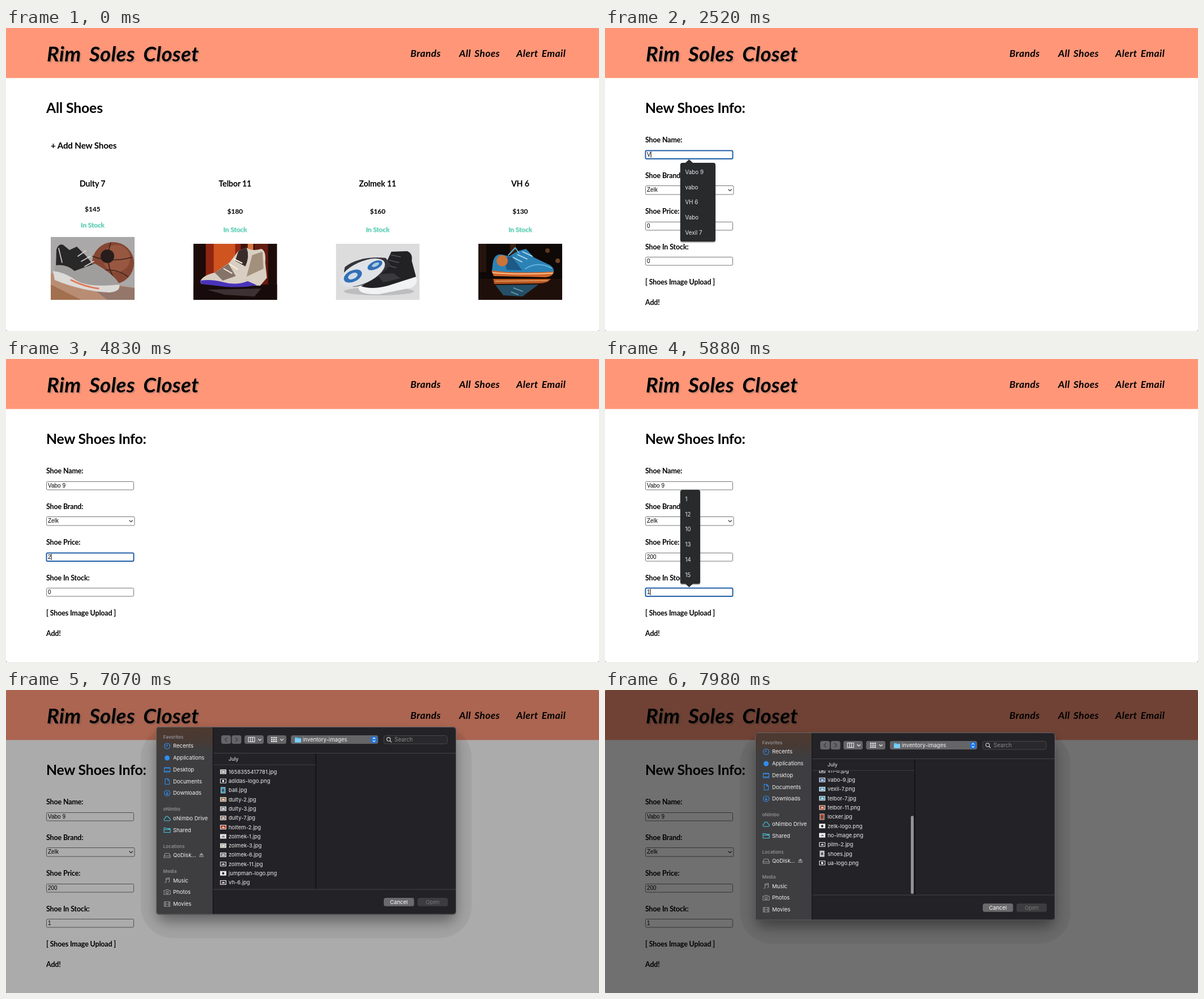
Animation, 1047 px wide and 535 px high, one loop 8000 ms. Source, as an HTML page:

```html
<!DOCTYPE html>
<html lang="en">
<head>
<meta charset="utf-8">
<title>Shoe inventory</title>
<style>
html, body { margin: 0; width: 100%; height: 100%; overflow: hidden; background: #777; }
svg { display: block; width: 100%; height: 100%; }
text { white-space: pre; }
.page { font-family: Lato, "Open Sans", sans-serif; font-weight: 700; letter-spacing: -.01em; }
.brand { font-family: Lato, sans-serif; font-weight: 700; font-style: italic; letter-spacing: .023em; }
.title { text-shadow: 2px 2px 2px rgba(120, 110, 105, .45); }
.stock { text-shadow: 1px 1px 1px rgba(95, 207, 181, .5); }
.field { font: 10px "Liberation Sans", Arial, sans-serif; letter-spacing: 0; }
.ui { font-family: Inter, Roboto, sans-serif; font-weight: 400; letter-spacing: 0; }
.mid { text-anchor: middle; }
.line { fill: none; stroke-linecap: round; stroke-linejoin: round; }
</style>
</head>
<body>
<svg id="stage" viewBox="0 0 1047 535" preserveAspectRatio="none"></svg>
<script>
const LOOP = 8000, STEP = 70;
const text = (x, y, size, str, fill = '#000', attrs = '') =>
  `<text x="${x}" y="${y}" font-size="${size}" fill="${fill}" ${attrs}>${str}</text>`;
const rect = (x, y, w, h, fill, r = 0, attrs = '') =>
  `<rect x="${x}" y="${y}" width="${w}" height="${h}" rx="${r}" fill="${fill}" ${attrs}/>`;
const path = (d, fill, attrs = '') => `<path d="${d}" fill="${fill}" ${attrs}/>`;
const line = (d, color, width = 1.1) =>
  `<path class="line" d="${d}" stroke="${color}" stroke-width="${width}"/>`;
const circle = (x, y, r, fill, attrs = '') =>
  `<circle cx="${x}" cy="${y}" r="${r}" fill="${fill}" ${attrs}/>`;
const ellipse = (x, y, rx, ry, fill, turn = 0) =>
  `<ellipse cx="${x}" cy="${y}" rx="${rx}" ry="${ry}" fill="${fill}" transform="rotate(${turn} ${x} ${y})"/>`;

// Product photos, drawn in a 148 wide box whose bottom is at y = 99 (111 for the first).
const photos = [
  rect(0, 0, 148, 111, '#aaa8a8') + path('M0 64L148 90V111H0Z', '#b98d74') +
  path('M0 84L54 111H0Z', '#a2704f') + path('M60 80L148 90V111H100Z', '#94766a') +
  circle(110, 46, 37, '#854733') + circle(116, 38, 24, '#985740') +
  line('M74 34Q104 46 143 36M106 10Q92 48 118 83M76 64Q110 50 136 70', '#3c211b', 1.6) +
  circle(100, 34, 12, '#281d1c') +
  path('M10 22Q14 11 22 14L33 23L46 17L62 33L80 56L50 66L9 56Z', '#292829') +
  path('M8 50Q28 47 42 60L78 47Q112 66 121 83Q118 94 92 94L30 84L6 66Z', '#a09e9d') +
  path('M4 60Q24 62 44 76T121 84Q124 96 104 98Q56 96 7 76Z', '#dcdad7') +
  line('M14 20L20 45M48 34L62 24M54 43L70 34M60 52L76 43', '#d6d4d2', 1.6) +
  line('M36 76Q60 88 84 91', '#e27755', 3),

  rect(0, 0, 148, 99, '#1c0b08') + rect(22, 0, 62, 72, '#8f2611') + rect(36, 0, 38, 66, '#cf5420') +
  rect(84, 0, 12, 60, '#3b130c') + rect(96, 0, 10, 70, '#d9763a') + rect(108, 0, 24, 76, '#651c10') +
  rect(0, 72, 148, 27, '#170c0b') +
  path('M12 66Q18 55 38 51L64 33L80 12L94 7Q104 14 120 9Q129 12 127 33L130 60L118 74L60 72L14 71Z', '#d8cfc2') +
  path('M38 51L62 35L75 57L52 65Z', '#85736a') + path('M80 12L94 7Q100 22 92 40L74 30Z', '#3a2c2a') +
  path('M104 20L122 14L124 44L94 58Z', '#a3907c') + line('M54 44L68 52M64 36L78 45M72 27L86 34', '#fff3df', 2) +
  path('M12 65Q32 62 54 68T96 66L112 73Q90 78 58 76L14 71Z', '#4934ba') +
  path('M24 81L120 79L108 93L56 90Z', '#66565c', 'opacity=".5"'),

  rect(0, 0, 148, 99, '#dcdcdd') + ellipse(76, 84, 62, 7, '#bdbdc0') +
  path('M58 66L86 40L98 14L126 13Q136 17 134 30L142 60Q142 73 130 76L72 88Q44 88 42 77Z', '#222225') +
  path('M42 74Q62 82 92 74L142 58Q146 72 132 78L76 89Q42 90 40 79Z', '#f1f2f3') +
  path('M72 54L102 52L114 61L84 68Z', '#39393e') + line('M90 38L106 42M94 29L111 33M98 20L114 23', '#55555a', 1.6) +
  path('M16 41Q42 21 88 25L97 37Q62 74 31 76Q9 67 16 41Z', '#343439') +
  ellipse(47, 51, 43, 19, '#dfe3e7', -25) + ellipse(30, 57, 17, 10, '#3270b7', -25) +
  ellipse(69, 38, 14, 7, '#3270b7', -25) + ellipse(30, 57, 9, 5, '#cfdce6', -25) + ellipse(70, 37, 7, 3, '#a8c9e2', -25),

  rect(0, 0, 148, 99, '#0e0806') + rect(0, 0, 14, 50, '#25140d') + rect(56, 0, 10, 22, '#38200f') +
  circle(122, 12, 4, '#5d3920') + circle(140, 30, 4, '#6e4427') + rect(0, 62, 148, 37, '#1f0f0a') +
  path('M25 37Q27 17 41 19L55 22L69 13L84 9L98 24L127 38Q136 45 132 52L80 54L24 48Z', '#2c82b5') +
  path('M44 24L60 23L77 47L50 46Z', '#1e5a88') + line('M61 24L77 32M69 19L86 27M78 14L95 22', '#b9e2ee', 1.6) +
  line('M53 20L65 7L72 17M83 44Q105 30 129 43', '#5eb3dc', 2) + circle(42, 30, 10, '#cc733a') +
  path('M23 47Q62 53 133 49Q132 58 118 59L27 57Z', '#d4652c') + line('M25 51Q70 55 131 52', '#ffd7a3', 1.6) +
  path('M26 62L128 62Q122 70 106 70L28 71Z', '#b8561f') + line('M30 66L122 65', '#e6a368', 1.4) +
  path('M30 73L106 72L78 93L44 91Z', '#27607f', 'opacity=".8"') + line('M62 78L78 84M58 85L70 90', '#6fa5b8', 1.4)
];

const shoes = [['Dulty 7', 145], ['Telbor 11', 180], ['Zolmek 11', 160], ['VH 6', 130]];
const shopPage = text(71, 149.5, 24.8, 'All Shoes') +
  text(79, 213, 15.2, '+ Add New Shoes', '#000', 'id="add"') +
  shoes.map(([name, price], i) => {
    const x = 79 + i * 251.7, cx = x + 73.7, h = i ? 99 : 111;
    return text(cx, 280, 14.2, name, '#000', 'class="mid"') +
      text(cx, i ? 327.5 : 323.5, 12, '$' + price, '#000', 'class="mid"') +
      text(cx, i ? 360 : 352, 12, 'In Stock', '#5fcfb5', 'class="mid stock"') +
      `<svg x="${x}" y="${480 - h}" width="148" height="${h}">${photos[i]}</svg>`;
  }).join('');

const labels = [['Shoe Name:', 202], ['Shoe Brand:', 264.5], ['Shoe Price:', 328], ['Shoe In Stock:', 390.5],
  ['[ Shoes Image Upload ]', 453], ['Add!', 489]];
const formPage = text(71, 149.5, 24.8, 'New Shoes Info:') +
  labels.map(([s, y]) => text(71, y, 12.5, s)).join('') + '<g id="fields"></g><g id="menu"></g>';

// Open panel
const BLUE = '#2f8df0', TEAL = '#45c5dc', GREY = '#98989b';
const icons = {
  clock: 'M-5 0a5 5 0 1 0 10 0a5 5 0 1 0 -10 0M0 -3V0H-2.5',
  desk: 'M-5 -4H5V4H-5ZM-5 -3H5M-5 2.5H5',
  page: 'M-3.5 -5H1L4 -2V5H-3.5ZM1 -5V-2H4',
  down: 'M-5 0a5 5 0 1 0 10 0a5 5 0 1 0 -10 0M0 -2.5V2.5M-2 .7L0 2.7L2 .7',
  cloud: 'M-3.5 4H3.5Q6 3.5 5.5 1Q5 -1 3 -1Q2 -4.5 -1 -4Q-3.5 -3.5 -3.5 -.5Q-6 0 -5.5 2Q-5 4 -3.5 4Z',
  folder: 'M-5.5 4V-4H-2L-1 -3H5.5V4ZM-5.5 -1H5.5M2 -3V-1M4 -3V-1',
  disk: 'M-5.5 1L-3.5 -3.5H3.5L5.5 1V4H-5.5ZM-5.5 1H5.5',
  note: 'M-2 3V-4L4 -5V2M-2 -2L4 -3M-4 3.5H-2.5M2 2.5H3.5',
  camera: 'M-5.5 -3H-2.5L-1.5 -4.5H1.5L2.5 -3H5.5V4H-5.5ZM-2 .5a2 2 0 1 0 4 0a2 2 0 1 0 -4 0',
  film: 'M-5 -4H5V4H-5ZM-3 -4V4M3 -4V4M-3 0H3'
};
const icon = (name, x, y, color) => `<g transform="translate(${x} ${y})">` +
  (icons[name] ? line(icons[name], color) : circle(0, 0, 4.5, color)) + '</g>';
const places = [['Recents', 109, 'clock', BLUE], ['Applications', 130, 'dot', BLUE], ['Desktop', 151, 'desk', BLUE],
  ['Documents', 171.5, 'page', BLUE], ['Downloads', 192, 'down', BLUE], ['oNimbo Drive', 237, 'cloud', TEAL],
  ['Shared', 257.5, 'folder', TEAL], ['QoDisk...', 302, 'disk', GREY], ['Music', 346.5, 'note', GREY],
  ['Photos', 367, 'camera', GREY], ['Movies', 388, 'film', GREY]];
const groups = [['Favorites', 93], ['oNimbo', 220.5], ['Locations', 286], ['Media', 330]];
const files = `1658355417781.jpg #9a9a9a,adidas-logo.png #111,ball.jpg #2c9fc4,dulty-2.jpg #a37a55,dulty-3.jpg #8b9190,
dulty-7.jpg #8a7672,holtem-2.jpg #b3381f,zolmek-1.jpg #ddd,zolmek-3.jpg #b8b5ae,zolmek-6.jpg #77777a,zolmek-11.jpg #303034,
jumpman-logo.png #e8e8e8,vh-6.jpg #3b3036,vabo-9.jpg #4468a0,vexil-7.png #58a4c8,telbor-7.jpg #4d9ab5,telbor-11.png #a9432b,
locker.jpg #b34a2d,zelk-logo.png #eee,no-image.png #f4f4f4,pilm-2.jpg #252528,shoes.jpg #bcc0c5,ua-logo.png #222`
  .split(/,\s*/).map(s => s.split(' '));
const fileRow = ([name, color], i) => {
  const y = 154.3 + i * 16.3, tall = /^(ball|locker|shoes)/.test(name);
  const thumb = tall ? rect(379.5, y - 5, 7.5, 10, color, 0, 'stroke="#ddd" stroke-width=".8"')
    : rect(378.5, y - 3.5, 10, 7, color, 0, 'stroke="#eee"');
  const spot = /logo/.test(name) ? circle(383.5, y, 2, color < '#8' ? '#fff' : '#222')
    : tall ? rect(381.5, y - 2, 3.5, 4, '#4a4d55') : path(`M380 ${y + 1.5}L384 ${y - 1.5}L387 ${y + 1.5}Z`, color > '#d' ? '#777' : '#e8e3dc');
  return thumb + spot + text(393, y + 3.4, 9.5, name, '#ececee');
};
const pill = (x, w) => rect(x, 90, w, 15, '#656568', 3.5);
const panel = rect(265, 75, 530, 331.5, '#232327', 5.5) +
  path('M365 75.5H271Q265.5 75.5 265.5 81V400.5Q265.5 406 271 406H365Z', 'url(#side)') +
  rect(365, 75.5, 1, 330.5, '#0d0d0f') +
  rect(366, 121, 429, 1, '#444448') + rect(366, 361.5, 429, 1, '#444448') + rect(546.5, 122, 1, 239.5, '#09090a') +
  `<g clip-path="url(#list)"><g id="files">${files.map(fileRow).join('')}</g></g>` +
  rect(540, 142, 5, 138, '#929295', 2.5, 'id="thumb"') +
  rect(366, 141.5, 180.5, 1, '#3e3e42') + text(393, 135.2, 8.5, 'July', '#c5c5c8', 'font-weight="600"') +
  groups.map(([s, y]) => text(277.5, y + 2.8, 8, s, '#8f8f92', 'font-weight="600"')).join('') +
  places.map(([s, y, id, c]) => icon(id, 284.5, y, c) + text(295, y + 3.4, 9.5, s, '#f2f2f3')).join('') +
  path('M341 302L345 297.5L349 302ZM341 303.3H349V304.8H341Z', GREY) +
  pill(380, 17) + pill(398.5, 17) + pill(421, 34) + pill(461, 34) + pill(503, 154) +
  line('M390 94L386.5 97.5L390 101M405.5 94L409 97.5L405.5 101', '#38383b') +
  line('M428 93.5H439V101.5H428ZM431.7 93.5V101.5M435.3 93.5V101.5M445.5 96.5L448 99L450.5 96.5M484.5 96.5L487 99L489.5 96.5', '#ededee') +
  [0, 1, 2].map(i => [0, 1, 2].map(j => rect(468 + i * 3.8, 93 + j * 3.4, 2.7, 2.2, '#ededee', .4)).join('')).join('') +
  path('M510 93.5H514L515.5 94.7H521V102.5H510Z', '#58b9ee') + rect(510, 96, 11, 6.5, '#7bcdf7', .5) +
  text(524, 101, 9.5, 'inventory-images', '#f4f4f5') +
  rect(644.5, 92, 10.5, 11.5, '#1873e0', 3) + line('M647.8 96.2L649.8 94.2L651.8 96.2M647.8 99.3L649.8 101.3L651.8 99.3', '#fff') +
  rect(667, 90.5, 112, 14.5, '#29292c', 3.5, 'stroke="#48484c"') +
  circle(675.5, 97, 3.2, 'none', 'stroke="#d8d8da" stroke-width="1.1"') + line('M678 99.5L680.5 102', '#d8d8da') +
  text(686, 101, 9.7, 'Search', '#8b8b8e') +
  rect(667, 377, 53.5, 14.8, '#6a6a6d', 3.5) + rect(726.5, 377, 53.5, 14.8, '#3d3d40', 3.5) +
  text(693.7, 387.8, 9.5, 'Cancel', '#fff', 'class="mid"') + text(753.2, 387.8, 9.5, 'Open', '#77777a', 'class="mid"') +
  rect(265.5, 75.5, 529, 330.5, 'none', 5.5, 'stroke="#66666a"');

const nav = [['Brands', 714], ['All Shoes', 800], ['Alert Email', 901]];
document.getElementById('stage').innerHTML = `<defs>
  <filter id="blur" x="-20%" y="-20%" width="140%" height="140%"><feGaussianBlur stdDeviation="12"/></filter>
  <linearGradient id="side" x1="0" y1="75" x2="0" y2="406" gradientUnits="userSpaceOnUse">
    <stop offset="0" stop-color="#4e392f"/><stop offset=".07" stop-color="#483a34"/>
    <stop offset=".13" stop-color="#3e3e40"/><stop offset="1" stop-color="#3e3e40"/></linearGradient>
  <clipPath id="list"><rect x="366" y="142" width="180" height="219.5"/></clipPath>
  <clipPath id="window"><rect width="1047" height="535" rx="3"/></clipPath></defs>
  <g clip-path="url(#window)">${rect(0, 0, 1047, 535, '#fff')}${rect(0, 0, 1047, 88.3, '#ff9678')}
  <g class="brand">${text(72, 58.5, 36.5, 'Rim Soles Closet', '#000', 'class="title" word-spacing="6"')}
  ${nav.map(([s, x]) => text(x, 51, 17.5, s, '#000', 'word-spacing="2"')).join('')}</g>
  <g class="page" id="shop">${shopPage}</g><g class="page" id="form">${formPage}</g>
  <rect id="shade" width="1047" height="535"/>
  <g id="sheet">${rect(238, 74, 584, 374, '#000', 56, 'opacity=".05"')}
  ${rect(267, 92, 526, 326, '#000', 14, 'id="shadow" filter="url(#blur)"')}
  <g class="ui" id="panel">${panel}</g></g></g>`;

const el = {};
document.querySelectorAll('#stage [id]').forEach(n => el[n.id] = n);
const pen = document.createElement('canvas').getContext('2d');
pen.font = '10px "Liberation Sans", Arial, sans-serif';

// Each track lists [start, value]; the last one started is current.
const at = (track, t) => track.reduce((cur, row) => t >= row[0] ? row : cur, [0, '']);
const tracks = {
  name: [[2520, 'V'], [2660, 'Va'], [2870, 'Vab'], [3010, 'Vabo'], [3360, 'Vabo '], [3570, 'Vabo 9']],
  price: [[0, '0'], [4830, '2'], [4970, '20'], [5110, '200']],
  stock: [[0, '0'], [5600, '1']],
  focus: [[2030, 'name'], [3850, 'brand'], [4200, 'price'], [5320, 'stock'], [6510, '']]
};
const menus = [
  [2100, ['Vabo 9', 'Dulty 7', 'vabo', 'VH 6', 'Vabo', 'Vexil 7'], 62, 238],
  [2520, ['Vabo 9', 'vabo', 'VH 6', 'Vabo', 'Vexil 7'], 62, 238],
  [2660, ['Vabo 9', 'vabo', 'Vabo'], 62, 238],
  [3360, ['Vabo 9'], 62, 238], [3570, ''],
  [4900, ['200', '220', '210', '225'], 41, 364],
  [4970, ['200'], 41, 364], [5110, ''],
  [5670, ['1', '12', '10', '13', '14', '15'], 35, 231, true], [6510, '']
];

function field(id, y, t) {
  const [since, focus] = at(tracks.focus, t), on = focus === id, w = id === 'brand' ? 155.5 : 154;
  const [typed, value] = id === 'brand' ? [0, 'Zelk'] : at(tracks[id], t);
  const picked = on && value === '0', width = pen.measureText(value).width;
  const last = Math.max(since, typed), caret = on && id !== 'brand' && !picked && (t - last) % 1000 < 490;
  return rect(71.5, y + .5, w, id === 'brand' ? 15.5 : 14.5, '#fff', 2,
      on ? 'stroke="#2260a8" stroke-width="2"' : 'stroke="#777"') +
    (picked ? rect(74, y + 2, width, 11.5, '#b3d7fe') : '') +
    text(74, y + 11, 10, value, '#000', 'class="field"') +
    (caret ? rect(74 + width, y + 2, 1, 11, '#000') : '') +
    (id === 'brand' ? line(`M218 ${y + 7}L220.7 ${y + 9.7}L223.4 ${y + 7}`, '#333', 1.2) : '');
}

function menu(t) {
  const [, rows, w, y, above] = at(menus, t);
  if (!rows) return '';
  const h = rows.length * 26.7 + 5.7, tip = above ? y + h + 6 : y - 6, base = above ? y + h : y;
  return rect(132.5, y + 1, w + 1, h + 1, '#000', 4, 'opacity=".25"') + rect(133, y, w, h, '#292a2c', 3.5) +
    path(`M142 ${base}L148.5 ${tip}L155 ${base}Z`, '#292a2c') +
    rows.map((s, i) => text(141.5, y + 20 + i * 26.7, 9.8, s, '#e8eaed', 'class="ui"')).join('');
}

const clamp = v => Math.min(1, Math.max(0, v));
const show = (node, on) => node.style.display = on ? '' : 'none';

function draw(t) {
  show(el.shop, t < 1260);
  show(el.form, t >= 1260);
  const hover = clamp((t - 700) / 280);
  el.add.setAttribute('fill', `rgb(${255 * hover},${150 * hover},${120 * hover})`);
  el.fields.innerHTML = field('name', 216, t) + field('brand', 278, t) + field('price', 342, t) + field('stock', 404, t);
  el.menu.innerHTML = menu(t);

  const open = clamp((t - 6930) / 280), ease = 1 - (1 - open) ** 1.27;
  show(el.sheet, t >= 6930);
  el.sheet.setAttribute('transform', `translate(0 ${-24 * (1 - ease)})`);
  el.shade.setAttribute('opacity', .56 * ease);
  el.shadow.setAttribute('opacity', .4 * clamp(2 * open));
  el.panel.setAttribute('opacity', clamp(.11 + 1.78 * open));

  const s = clamp((t - 7700) / 280), scroll = s * s * (3 - 2 * s);
  el.files.setAttribute('transform', `translate(0 ${-207.5 * scroll})`);
  show(el.thumb, s > 0);
  el.thumb.setAttribute('y', 142 + 80 * scroll);
}

let shown = -1;
const begin = performance.now();
function tick() {
  const t = Math.floor((performance.now() - begin) % LOOP / STEP) * STEP;
  if (t !== shown) draw(shown = t);
  requestAnimationFrame(tick);
}
tick();
</script>
</body>
</html>
```
